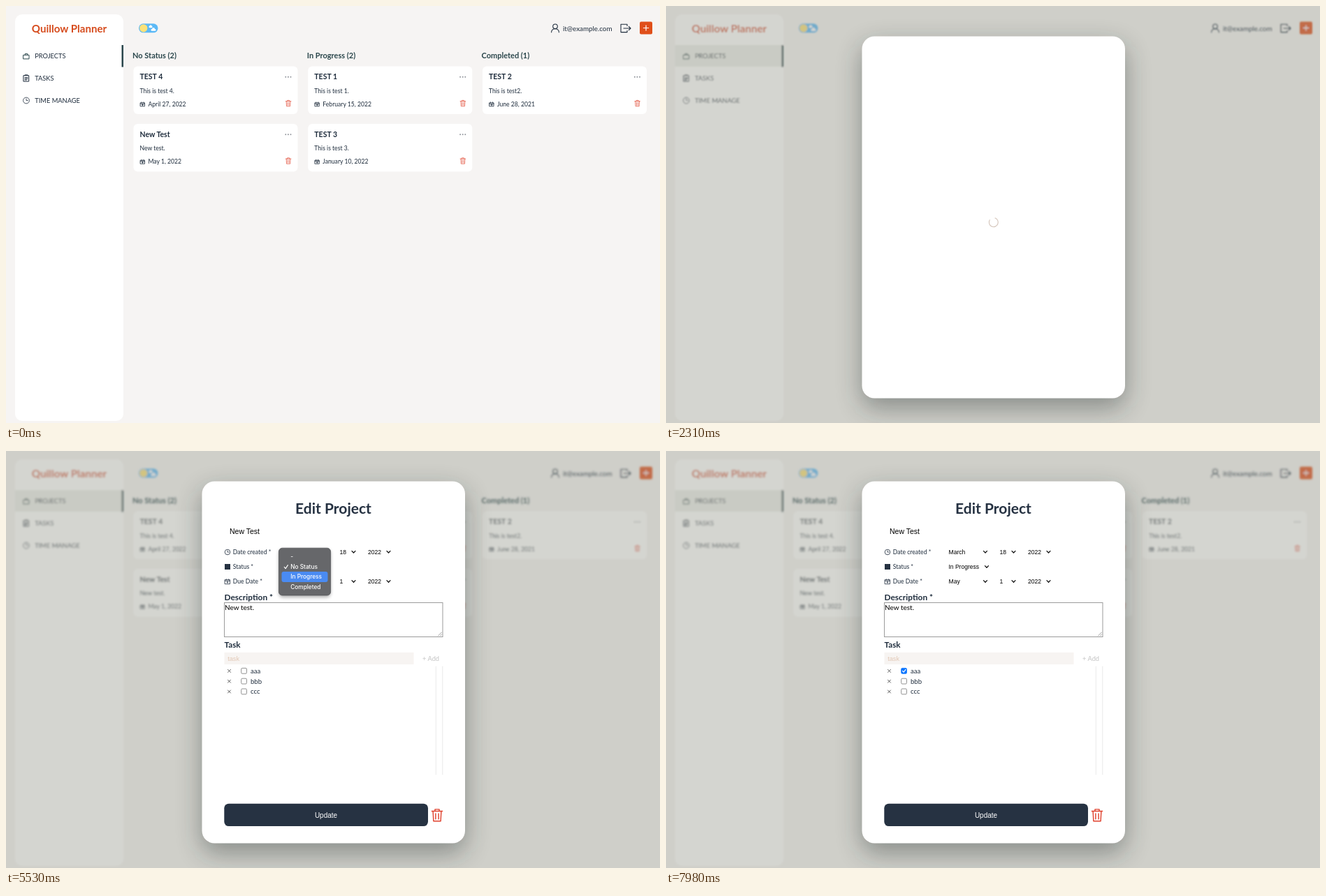
Recreate the animation shown at these times as an HTML page. Size 936 px wide and 598 px high, loop 8 s.

```html
<!DOCTYPE html>
<html lang="en">
<head>
<meta charset="utf-8">
<title>Project board</title>
<style>
  html, body { margin: 0; width: 100%; height: 100%; overflow: hidden; background: #f6f4f3; }
  svg { display: block; width: 936px; height: 598px; }
  text { font-family: Lato, sans-serif; white-space: pre; }
  text.ui { font-family: "Liberation Sans", Arial, sans-serif; }
  text.menu { font-family: Inter, sans-serif; }
</style>
</head>
<body>
<svg id="stage" viewBox="0 0 936 598"></svg>
<script>
const INK = '#1f2d3d', TEAL = '#2b474c', ORANGE = '#d64c1e', RED = '#e5604e';

// Text placed by the middle of its capitals.
const text = (x, y, size, str, o = {}) =>
  `<text x="${x}" y="${y + size * .36}" font-size="${size}" font-weight="${o.weight || 400}"
    fill="${o.fill || INK}" text-anchor="${o.anchor || 'start'}" class="${o.font || ''}">${str}</text>`;
const ui = (x, y, size, str, o = {}) => text(x, y, size, str, { fill: '#000', ...o, font: 'ui' });
const rect = (x, y, w, h, r, fill, extra = '') =>
  `<rect x="${x}" y="${y}" width="${w}" height="${h}" rx="${r}" fill="${fill}" ${extra}/>`;
const circle = (x, y, r, fill, extra = '') => `<circle cx="${x}" cy="${y}" r="${r}" fill="${fill}" ${extra}/>`;
const line = (d, color = INK, width = 1, extra = '') =>
  `<path d="${d}" fill="none" stroke="${color}" stroke-width="${width}" stroke-linecap="round" stroke-linejoin="round" ${extra}/>`;
const group = (id, body, attrs = '') => `<g id="${id}" ${attrs}>${body}</g>`;

const clock = (x, y, r) =>
  circle(x, y, r, 'none', `stroke="${INK}" stroke-width=".8"`) + line(`M${x} ${y - r * .55}V${y}H${x + r * .5}`, INK, .8);
const calendar = (x, y, s) =>
  line(`M${x - s} ${y - s + 1}h${2 * s}v${2 * s - 1}h${-2 * s}z M${x - s} ${y - s + 2.5}h${2 * s}
    M${x - s / 2} ${y - s}v1 M${x + s / 2} ${y - s}v1 M${x - 1} ${y + 1}h2 M${x} ${y}v2`, INK, .8);
const trash = (x, y, k, color, w) =>
  line(`M-4 -3H4 M-1.6 -3V-4.4H1.6V-3 M-3.1 -3L-2.7 4.5H2.7L3.1 -3 M-1.1 -1.2V3 M1.1 -1.2V3`,
    color, w, `transform="translate(${x} ${y}) scale(${k})"`);
const dots = (x, y, fill) => [-3.6, 0, 3.6].map(d => circle(x + d, y, .95, fill)).join('');
const chevron = (x, y) => line(`M${x - 2.5} ${y - 1.2}l2.5 2.6l2.5 -2.6`, '#111', 1.3);

function card(x, y, title, note, date) {
  return rect(x, y, 235, 68.5, 6, '#fff') +
    text(x + 9, y + 15.2, 10.5, title, { weight: 700 }) +
    text(x + 9, y + 35, 8.6, note) +
    calendar(x + 13, y + 54.3, 3) +
    text(x + 21, y + 54, 8.6, date) +
    dots(x + 221.4, y + 15.3, '#8c9097') +
    trash(x + 221.6, y + 53, .95, RED, .85);
}

const column = (x, title, cards) =>
  text(x - 1.5, 71, 11, title, { weight: 700, fill: TEAL }) +
  cards.map((c, i) => card(x, 86.5 + i * 82.5, ...c)).join('');

const frame =
  rect(13, 12, 155, 583, 10, '#fff') +
  group('active', rect(13, 56, 153, 31, 0, '#eceeea')) +
  rect(165.5, 56, 2.5, 31.5, 0, TEAL) +
  text(90.5, 32.5, 15.1, 'Quillow Planner', { weight: 700, fill: ORANGE, anchor: 'middle' }) +
  line('M25 70.3h8v5.6h-8z M27.3 70v-1.6h3.4v1.6', TEAL, 1) +
  line('M25.3 99.7h7.4v8.4h-7.4z M27 99.7v-.8h4v.8 M27 102.6h4 M27 104.3h4 M27 106h2.5', INK, 1) +
  clock(29, 135.5, 4.4) +
  ['PROJECTS', 'TASKS', 'TIME MANAGE'].map((s, i) => text(41.2, 72 + i * 31.7, 9.3, s)).join('') +
  rect(190, 25.3, 27.5, 13, 6.5, '#5cb9f6') + circle(196.8, 31.8, 5.6, '#fbe27a') +
  rect(204.5, 28.6, 5, 2.6, 1.3, '#fff') + circle(207, 28.8, 1.5, '#fff') +
  rect(207.5, 33, 7, 2.8, 1.4, '#fff') + circle(211, 32.8, 1.9, '#fff') +
  circle(786, 29.3, 3.3, 'none', `stroke="${INK}" stroke-width="1.1"`) +
  line('M780.6 37.8c0 -6.8 10.8 -6.8 10.8 0', INK, 1.1) +
  text(797, 32, 9.8, 'it@example.com') +
  line('M889 28.5v-2.3h-9v11.4h9v-2.3 M884 32h10 M891.3 29.3l2.7 2.7l-2.7 2.7', INK, 1.1) +
  rect(907, 22.5, 18, 18, 2, '#e04f1a') + line('M912.4 31.5h7.2 M916 27.9v7.2', '#fff', 1.2);

const columns =
  column(182.5, 'No Status (2)', [
    ['TEST 4', 'This is test 4.', 'April 27, 2022'],
    ['New Test', 'New test.', 'May 1, 2022']]) +
  column(432.3, 'In Progress (2)', [
    ['TEST 1', 'This is test 1.', 'February 15, 2022'],
    ['TEST 3', 'This is test 3.', 'January 10, 2022']]) +
  column(682, 'Completed (1)', [
    ['TEST 2', 'This is test2.', 'June 28, 2021']]) +
  group('hover', dots(403.9, 184.3, '#22272e'));

const dateRow = (y, month, day) =>
  ui(404.5, y, 8.6, month) + chevron(457, y) +
  ui(477.5, y, 8.6, day) + chevron(497.5, y) +
  ui(518, y, 8.6, '2022') + chevron(547.5, y);

const tasks = ['aaa', 'bbb', 'ccc'].map((s, i) => {
  const y = 315.4 + i * 14.8;
  return line(`M317.5 ${y - 2}l4 4 M321.5 ${y - 2}l-4 4`, '#333', .8) +
    rect(336.7, y - 4, 7.8, 7.8, 1.5, '#fff', `stroke="#767676" stroke-width=".8" ${i ? '' : 'id="box"'}`) +
    text(350, y, 9.6, s);
}).join('') + group('tick', line('M338.6 315.5l1.6 1.7l2.8 -3.8', '#fff', 1.2));

const form =
  text(468.5, 82, 21, 'Edit Project', { weight: 700, fill: '#263242', anchor: 'middle' }) +
  ui(320, 115.5, 10.5, 'New Test') +
  clock(317, 145, 3.8) + text(324.8, 145, 8.6, 'Date created *') +
  rect(313, 162, 8, 8, 0, '#263242') + text(324.8, 166.3, 8.6, 'Status *') +
  calendar(317, 187.2, 3.5) + text(324.8, 187.3, 8.6, 'Due Date *') +
  dateRow(144.6, 'March', '18') + dateRow(186.8, 'May', '1') +
  group('oldStatus', ui(404.5, 165.6, 8.5, 'No Status')) +
  group('newStatus', ui(404.5, 165.6, 8.5, 'In Progress')) + chevron(459, 165.8) +
  text(312.5, 210, 11.9, 'Description *', { weight: 700 }) +
  rect(312.5, 217.5, 312.5, 49, 0, '#fff', 'stroke="#9b9b9b"') +
  line('M618.5 265l5 -5 M621.5 265l2 -2', '#777', .7) +
  text(313, 224.6, 10, 'New test.', { fill: '#000' }) +
  text(312.5, 278, 11.7, 'Task', { weight: 700 }) +
  rect(312.5, 288.8, 271, 17.2, 0, '#f7f4f2') +
  ui(317.2, 297.3, 9.2, 'task', { fill: '#e2c8b6' }) +
  text(596, 297.3, 9.3, '+ Add', { fill: '#c4c4c4' }) +
  tasks +
  line('M615.3 309V464 M624.8 309V464', '#e9e9e9', 1) +
  rect(312.3, 505.7, 291.7, 32.4, 6.5, '#263242') +
  ui(458, 522, 10, 'Update', { fill: '#fff', anchor: 'middle' }) +
  trash(617, 522.2, 1.9, '#e0402c', .75);

const rowY = i => 150.8 + i * 14.8;
const popup =
  rect(390.5, 141, 74, 69, 6, '#000', 'opacity=".3" filter="url(#soft)"') +
  rect(390.4, 139.2, 74.2, 67.8, 5, '#66676a', 'stroke="#505154" stroke-width=".7"') +
  rect(394.5, 0, 66, 15, 3, '#4a8bf2', 'id="mark"') +
  ['-', 'No Status', 'In Progress', 'Completed'].map((s, i) =>
    text(407.2, rowY(i), 8.3, s, { weight: 500, fill: '#fff', font: 'menu' })).join('') +
  line('M398.3 166.3l1.8 2.3l3.3 -5', '#fff', 1.1);

document.getElementById('stage').innerHTML = `
  <defs>
    <filter id="blur" filterUnits="userSpaceOnUse" x="0" y="0" width="936" height="598"><feGaussianBlur id="amount"/></filter>
    <filter id="soft" x="-30%" y="-30%" width="160%" height="160%"><feGaussianBlur stdDeviation="2.5"/></filter>
    <filter id="wide" x="-30%" y="-30%" width="160%" height="160%"><feGaussianBlur stdDeviation="18"/></filter>
  </defs>` +
  rect(0, 0, 936, 598, 0, '#f6f4f3') +
  group('board', frame + group('columns', columns)) +
  group('modal',
    rect(0, 0, 936, 598, 0, '#94968a', 'opacity=".4"') +
    rect(280.5, 57, 376.5, 519, 18, '#1e2826', 'opacity=".4" filter="url(#wide)"') +
    rect(280.5, 43.5, 376.5, 519, 18, '#fff') +
    group('spinner', line('M471 304.1A6.5 6.5 0 1 1 463.3 306.8', '#d3c3b8', 1.1)) +
    group('form', form) + group('popup', popup));

const el = Object.fromEntries([...document.querySelectorAll('#stage [id]')].map(e => [e.id, e]));
const show = (id, on) => { el[id].style.display = on ? '' : 'none'; };
const set = (id, attrs) => { for (const k in attrs) el[id].setAttribute(k, attrs[k]); };
const clamp = v => Math.max(0, Math.min(1, v));

const OPEN = 2310, LOADED = 2450, MENU = 4130, MOVE = 5530, PICK = 5950, CHECK = 7560;

function draw(t) {
  const open = t >= OPEN, loaded = t >= LOADED, checked = t >= CHECK;
  show('modal', open);
  show('active', open);
  show('columns', !open || loaded);
  show('hover', t >= 1470 && !open);
  show('spinner', !loaded);
  show('form', loaded);
  if (open) set('board', { filter: 'url(#blur)' });
  else el.board.removeAttribute('filter');
  set('amount', { stdDeviation: 1.3 + .5 * clamp((t - OPEN) / 210) });
  set('spinner', { transform: `rotate(${(t - OPEN) * .36} 469 310.5)` });

  const fade = clamp((6303 - t) / 253);
  show('popup', t >= MENU && fade > 0);
  set('popup', { opacity: fade });
  set('mark', { y: rowY(t < MOVE ? 1 : 2) - 7.5 });
  show('mark', t < PICK || t >= PICK + 70);
  show('oldStatus', t < 6230);
  show('newStatus', t >= 6230);

  const near = t >= 7140 && t < 7980;
  const blue = near ? '#0a66d8' : '#0b75ff';
  set('box', {
    fill: checked ? blue : t >= 7420 ? '#ececec' : '#fff',
    stroke: checked ? blue : near ? '#4f4f4f' : '#767676'
  });
  show('tick', checked);
}

function tick() {
  const t = performance.now() % 8000;
  draw(Math.floor(t / 70) * 70);
  requestAnimationFrame(tick);
}
tick();
</script>
</body>
</html>
```
